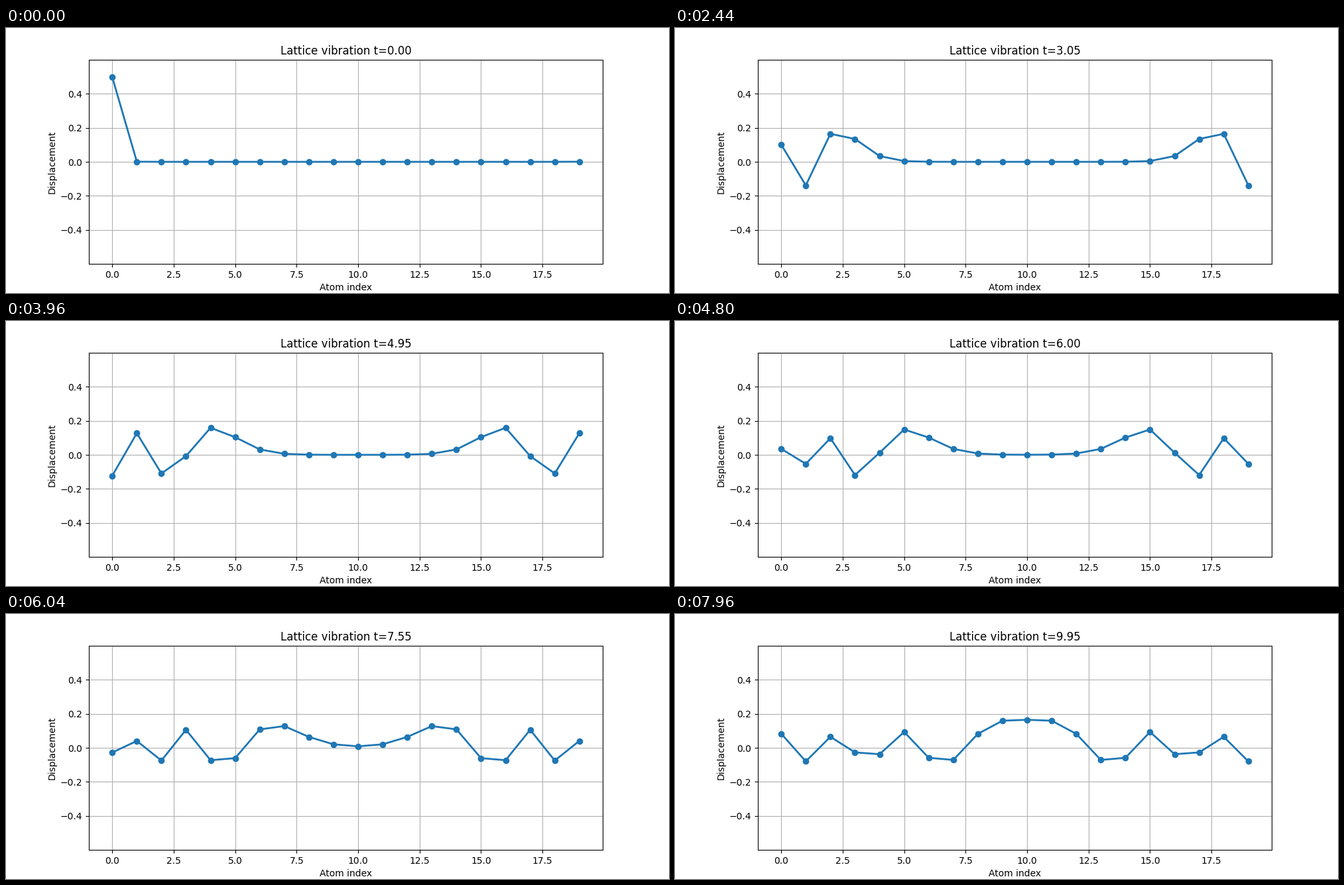
A matplotlib script that plays this animation: 1000x400 px, repeating every 8000 ms.

```python
import numpy as np
import matplotlib.pyplot as plt
from matplotlib.animation import FuncAnimation

ATOMS = 20
FRAMES = 200
DT = 0.05
STIFFNESS = 1.0
MASS = 1.0


def acceleration(u):
    """Nearest-neighbour springs on a closed ring."""
    return STIFFNESS / MASS * (np.roll(u, 1) + np.roll(u, -1) - 2 * u)


def simulate():
    """Velocity Verlet; row i holds the state after i + 1 steps."""
    u = np.zeros(ATOMS)
    u[0] = 0.5
    v = np.zeros(ATOMS)
    a = acceleration(u)
    states = []
    for _ in range(FRAMES):
        u = u + v * DT + 0.5 * a * DT**2
        a_next = acceleration(u)
        v = v + 0.5 * (a + a_next) * DT
        a = a_next
        states.append(u)
    return np.array(states)


states = simulate()

fig, ax = plt.subplots(figsize=(10, 4), dpi=100)
line, = ax.plot(np.arange(ATOMS), states[0], "o-", lw=2)
ax.set_ylim(-0.6, 0.6)
ax.set_yticks(np.arange(-2, 3) * 0.2)
ax.set_xlabel("Atom index")
ax.set_ylabel("Displacement")
ax.grid(True)
title = ax.set_title("")


def update(frame):
    line.set_ydata(states[frame])
    title.set_text(f"Lattice vibration t={frame * DT:.2f}")
    return line, title


anim = FuncAnimation(fig, update, frames=FRAMES, interval=40,
                     repeat=True, repeat_delay=0, blit=False)
plt.show()
```
